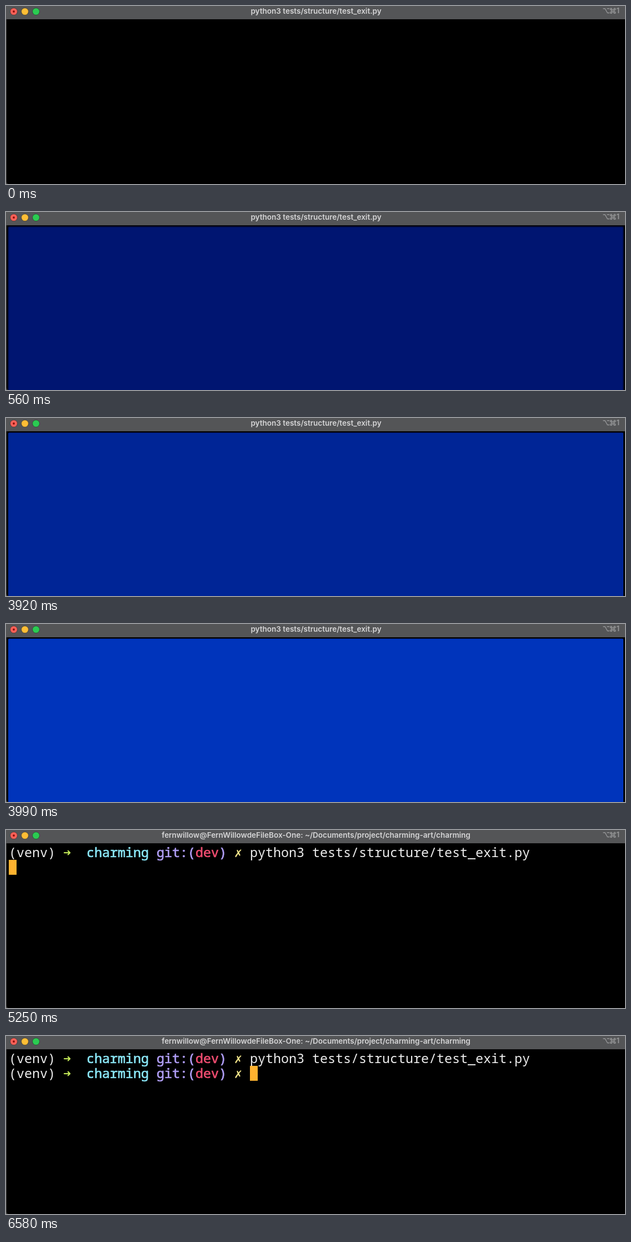
Recreate the animation shown at these times as an HTML page. Size 1114 by 322 pixels, loop 6.65 s.

```html
<!DOCTYPE html>
<html lang="en">
<head>
<meta charset="utf-8">
<title>Terminal exit test</title>
<style>
html, body { margin: 0; width: 100%; height: 100%; overflow: hidden; background: #000; }
svg { display: block; width: 1114px; height: 322px; overflow: hidden; }
.bar { font: 600 13.5px Inter, sans-serif; fill: #d6d6d7; }
.light { stroke: #0005; stroke-width: 1; }
.row { font: 23.333px "Noto Sans Mono", monospace; fill: #ececec; }
.symbol { font: bold 23.25px "DejaVu Sans Mono", monospace; }
.medium { stroke-width: .7; }
</style>
</head>
<body>
<svg viewBox="0 0 1114 322">
  <rect id="screen" x="4" y="26.5" width="1107" height="310" rx="1.5"/>
  <path d="M0 0H1114V24H0z" fill="#545557"/>
  <path d="M0 24H1V317Q1 322 4 322H0z" fill="#484848"/>
  <circle class="light" cx="14" cy="10" r="6.3" fill="#fc6158"/>
  <circle cx="14" cy="10" r="1.9" fill="#8c0f0c"/>
  <circle class="light" cx="34" cy="10" r="6.3" fill="#fdbe36"/>
  <circle class="light" cx="54" cy="10" r="6.3" fill="#2bcb52"/>
  <text id="title" class="bar" x="558" y="14.3" text-anchor="middle"></text>
  <g fill="none" stroke="#959697" stroke-width="1.4">
    <path d="M1074.5 4.7H1078L1082.5 12.5H1086M1081.5 4.7H1086"/>
    <path d="M1090.3 7.1H1094.1V10.5H1090.3z"/>
    <circle cx="1089" cy="5.7" r="1.5"/><circle cx="1095.4" cy="5.7" r="1.5"/>
    <circle cx="1089" cy="11.9" r="1.5"/><circle cx="1095.4" cy="11.9" r="1.5"/>
  </g>
  <text class="bar" x="1098.5" y="13.4" style="fill:#959697">1</text>
  <g id="shell">
    <g id="first" class="row"></g>
    <g id="second" class="row"></g>
    <rect id="cursor" y="54" width="14" height="27" fill="#ffb22f"/>
  </g>
</svg>
<script>
const LOOP = 6650, CELL = 14, LEFT = 5;
const EXIT = 5250, PROMPT = 5600;
const command = 'python3 tests/structure/test_exit.py';
const home = 'fernwillow@FernWillowdeFileBox-One: ~/Documents/project/charming-art/charming';
// start time, fill, edge softness
const fills = [
  [0, '#000', 0],
  [70, '#001571', 1],
  [2030, '#002596', .5],
  [3990, '#0034bb', 0]
];
// column, text, colour, style
const prompt = [
  [0, '(venv)', '#ececec'],
  [7, '➜', '#c4ea58', 'symbol'],
  [10, 'charming', '#8be7f8', 'medium'],
  [19, 'git:(', '#b19ff8', 'medium'],
  [24, 'dev', '#ee4d70', 'medium'],
  [27, ')', '#b19ff8', 'medium'],
  [29, '✗', '#f3e58a', 'symbol']
];
const $ = id => document.getElementById(id);

function write(row, y, parts) {
  for (const [col, text, color, kind = ''] of parts) {
    const el = document.createElementNS('http://www.w3.org/2000/svg', 'text');
    el.setAttribute('x', LEFT + col * CELL);
    el.setAttribute('y', y);
    el.setAttribute('class', kind);
    el.style.fill = color;
    if (kind === 'medium') el.style.stroke = color;
    el.textContent = text;
    row.append(el);
  }
}

function show(el, on) { el.style.display = on ? '' : 'none'; }

function draw() {
  const t = performance.now() % LOOP;
  const done = t >= EXIT, ready = t >= PROMPT;
  const [, color, soft] = fills.findLast(f => t >= f[0]);
  $('screen').style.fill = color;
  $('screen').style.filter = soft ? `blur(${soft}px)` : 'none';
  show($('screen'), !done);
  show($('shell'), done);
  show($('second'), ready);
  $('cursor').setAttribute('x', LEFT + (ready ? 31 * CELL : 0));
  $('title').textContent = done ? home : command;
  requestAnimationFrame(draw);
}

write($('first'), 49, [...prompt, [31, command, '#ececec']]);
write($('second'), 76, prompt);
draw();
</script>
</body>
</html>
```
